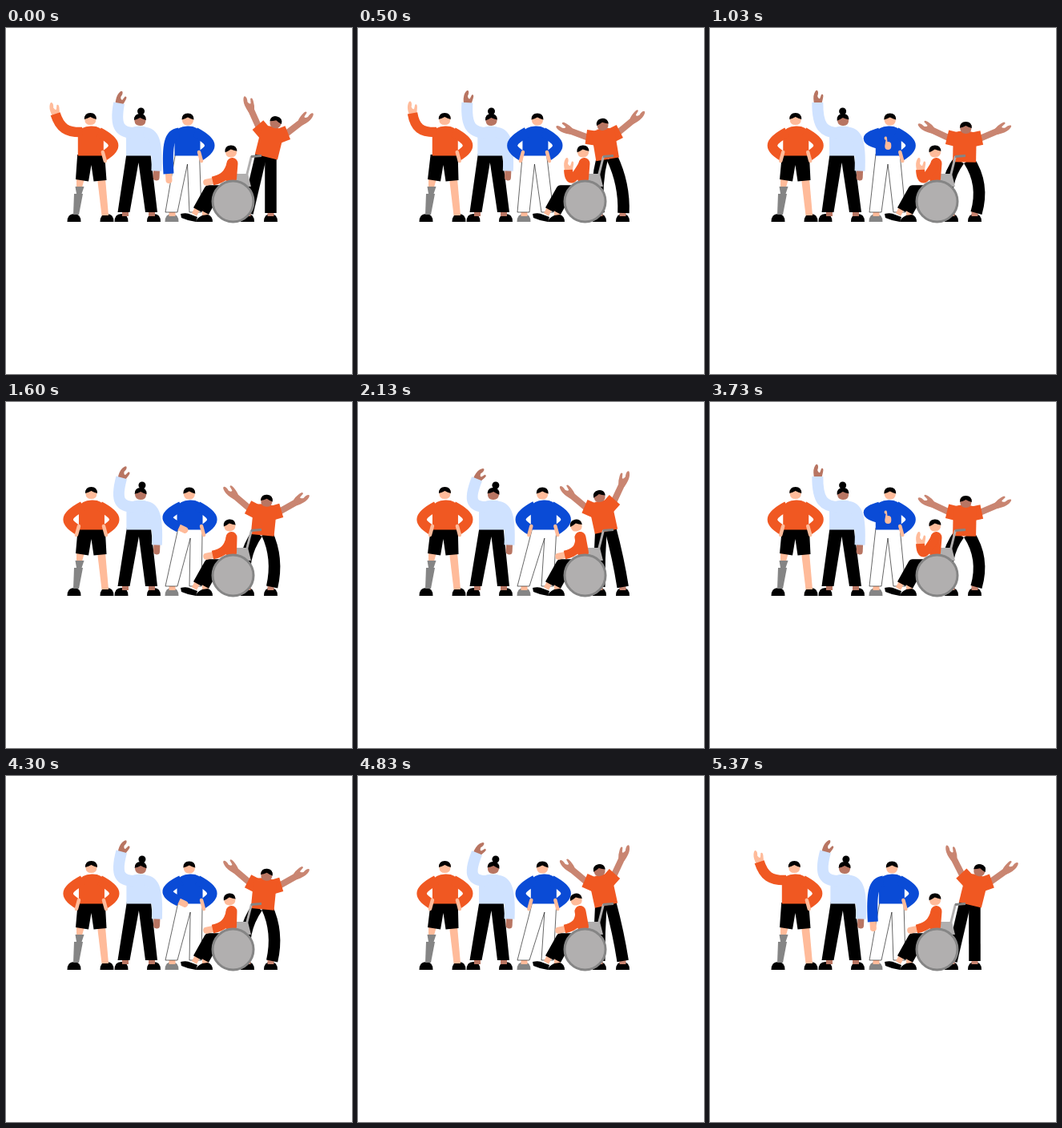
Recreate the animation shown at these times as an HTML page. Size 432x432 px, loop 5.41 s.

```html
<!DOCTYPE html>
<html lang="en">
<head>
<meta charset="utf-8">
<style>
  html, body { margin: 0; width: 100%; height: 100%; overflow: hidden; background: #fff; }
  svg { display: block; width: 100vw; height: 100vh; }
</style>
</head>
<body>
<svg id="stage" viewBox="0 0 432 432"></svg>
<script>
const stage = document.getElementById('stage');
const LOOP = 5410, CYCLE = 2700, TAU = Math.PI * 2;
const ORANGE = '#f05822', BLUE = '#0a4bd6', PALE = '#cfe2ff', BLACK = '#000', WHITE = '#fff';
const PEACH = '#ffbb9a', BROWN = '#b87562', TAN = '#c98571', GREY = '#858585', SILVER = '#b1afaf';

const mix = (a, b, k) => a + (b - a) * k;
const mixPoint = (p, q, k) => [mix(p[0], q[0], k), mix(p[1], q[1], k)];
const ramp = (t, from, to) => {
  const k = Math.min(1, Math.max(0, (t - from) / (to - from)));
  return k * k * (3 - 2 * k);
};
// Point at a clockwise angle in degrees, measured from straight up.
const polar = ([x, y], angle, length) => {
  const a = angle * TAU / 360;
  return [x + length * Math.sin(a), y - length * Math.cos(a)];
};
const heading = (p, q) => Math.atan2(q[0] - p[0], p[1] - q[1]) * 360 / TAU;

const fill = (d, color, extra = '') => `<path d="${d}" fill="${color}" ${extra}/>`;
const line = (d, color, width, cap = 'butt') =>
  `<path d="${d}" fill="none" stroke="${color}" stroke-width="${width}" stroke-linecap="${cap}" stroke-linejoin="round"/>`;
const at = ([x, y], angle, content) =>
  `<g transform="translate(${x} ${y}) rotate(${angle})">${content}</g>`;

const shoe = (x, color = BLACK) => fill(`M${x - 8.5} 242q0-10 8.5-10t8.5 10z`, color);
const ankle = (x, color) => line(`M${x} 227V235`, color, 8);

const head = (x, y, skin, tilt = 0) => at([x, y], tilt,
  fill('M-7-4V1Q-6.500 7 0 7T7 1V-4z', skin) +
  fill('M-7.500 0Q-7.500-8 0-8T7.500 0Q3.500-1 0-3Q-3.500-1-7.500 0z', BLACK));

const hand = skin => fill('M-4 3Q-6-6-4-11T0-15Q2-13 0-8Q1-4 3-5L5-10Q8-11 7-6Q6 0 4 3z', skin);
const fist = skin => line('M0 2V-8', skin, 8, 'round');

// A sleeve curves from shoulder to wrist around a corner point; the hand follows the forearm.
function arm({ shoulder, corner, wrist, flick = 0 }, color, width, handShape) {
  const [near, far] = [shoulder, wrist].map(p => mixPoint(p, corner, .75));
  return at(wrist, heading(corner, wrist) + flick, handShape) +
    line(`M${shoulder}C${near} ${far} ${wrist}`, color, width);
}

const mixArm = (a, b, k) => ({
  shoulder: mixPoint(a.shoulder, b.shoulder, k),
  corner: mixPoint(a.corner, b.corner, k),
  wrist: mixPoint(a.wrist, b.wrist, k)
});

const onHip = (x, side) =>
  ({ shoulder: [x + side * 10, 130], corner: [x + side * 40, 146], wrist: [x + side * 16, 160] });

const hipHand = (x, side, skin) =>
  line(`M${x + side * 15} 155l${side * 3} 11`, skin, 4.5, 'round');

const torso = (x, color) => at([x, 123], 0, fill('M-16 8Q-13 0 0-.5T16 8V36.500H-16z', color));

function trousers(waist, left, right, crotch, color, outline = '') {
  return fill(`M${waist - 15} 157L${left - 7.5} 230H${left + 7.5}L${waist} ${crotch}
    L${right - 7.5} 230H${right + 7.5}L${waist + 15} 157z`, color, outline);
}

function waver(t) {
  const beat = t + 15;
  const sway = -1.7 * Math.cos(TAU * beat / 1350);
  const raised = 1 - ramp(t, 770, 1000) + ramp(t, 2260, 2460);
  const corner = [71, 131];
  const waving = {
    shoulder: [97, 130], corner,
    wrist: polar(corner, -9 - 9 * Math.cos(TAU * beat / 675), 25)
  };
  const left = mixArm(onHip(106.5, -1), waving, raised);
  const swing = Math.sin(Math.PI * raised);
  left.wrist[0] -= 28 * swing;
  left.corner[0] -= 6 * swing;
  return shoe(85) + shoe(126) +
    fill('M114 188H124L128 234H119.500z', PEACH) +
    fill('M88 188H98L95 199H88z', PEACH) +
    fill('M86.500 198H97.500L94.500 207H96L91 233H84L85 207H88z', GREY) +
    fill(`M${90 + sway / 2} 158H${124 + sway / 2}L125.500 190 109.500 191.500 106.500 171 103 191.500 87 189z`, BLACK) +
    at([sway, 0], 0,
      torso(107.5, ORANGE) +
      arm(onHip(107.5, 1), ORANGE, 12.5, '') + hipHand(107.5, 1, PEACH) +
      arm(left, ORANGE, 12.5, raised > .1 ? hand(PEACH) : '') +
      (raised > .1 ? '' : hipHand(106.5, -1, PEACH)) +
      head(107, 114, PEACH));
}

function greeter(t) {
  const wave = Math.cos(TAU * (t - 335) / 450);
  const corner = [134, 132];
  const raised = {
    shoulder: [163, 131], corner,
    wrist: polar(corner, 11 + 11 * wave, 39),
    flick: 6 + 8 * wave
  };
  const lowered = { shoulder: [172, 130], corner: [190, 131], wrist: [188, 178.5] };
  return shoe(144) + shoe(184.5) + ankle(149, BROWN) + ankle(182, BROWN) +
    trousers(165.5 + wave, 147, 181.5, 168, BLACK) +
    at([wave, 0], 0, torso(166, PALE) + arm(lowered, PALE, 13, fist(BROWN))) +
    arm(raised, PALE, 14, hand(BROWN)) +
    `<circle cx="${168.7 + wave * 3.2}" cy="104" r="4.500"/>` +
    head(167.5 + wave * 1.5, 115, BROWN, wave * 5);
}

function thumbsUp(t) {
  const sway = -5.5 * Math.sin(TAU * t / CYCLE);
  const lowered = 1 - ramp(t, 60, 290) + ramp(t, 2330, 2600);
  const thumb = ramp(t, 500, 800) - ramp(t, 1400, 1700);
  const shoulder = [216, 131];
  const hanging = { shoulder, corner: [200, 133], wrist: [203, 182] };
  const signal = { shoulder, corner: [189, 139], wrist: [222, 146] };
  const pose = mixArm(mixArm(onHip(226, -1), hanging, lowered), signal, thumb);
  const thumbHand = line('M4 0V2', PEACH, 8, 'round') + line('M2-1L1-9', PEACH, 3.2, 'round');
  const resting = lowered < .1 && thumb < .1;
  const restingHand = thumb > .5 ? at([0, 0], -heading(pose.corner, pose.wrist), thumbHand) : fist(PEACH);
  return shoe(207, GREY) + ankle(207.5, PEACH) +
    trousers(226.5 + sway * 1.2, 206.5, 236.5, 170, WHITE, 'stroke="#000" stroke-width=".6"') +
    at([sway, 0], 0,
      torso(226.5, BLUE) +
      arm(onHip(226, 1), BLUE, 12.5, '') + hipHand(226, 1, PEACH) +
      arm(pose, BLUE, 13, resting ? '' : restingHand) +
      (resting ? hipHand(226, -1, PEACH) : '')) +
    head(227 + sway * .6, 114.5, PEACH);
}

function dancerArm(side, raise) {
  const shoulder = [side * 7, -27];
  const cuff = polar(shoulder, side * (78 - 25 * raise), 15);
  return at(cuff, side * (67 - 31 * raise),
    line('M0 6V-24', TAN, 8) +
    `<g transform="translate(0 -23) scale(${-side} 1.100)">${hand(TAN)}</g>`) +
    line(`M${mixPoint(shoulder, cuff, -.2)}L${cuff}`, ORANGE, 18);
}

function dancer(t) {
  const phase = t - 1015;
  const lean = Math.sin(Math.PI * phase / 675);
  const bend = 1 - Math.min(1, lean * lean * 1.15);
  const raise = .5 - .5 * Math.cos(TAU * (phase - 55) / 675);
  const x = 316.5 + 8 * lean, y = 160.5 + 6.5 * bend;
  const leg = side => {
    const top = x + side * 6, foot = 316 + side * (14.5 + 2 * bend);
    const knee = mix((top + foot) / 2, 316 + side * 27, bend);
    return line(`M${top} ${y - 2}Q${knee} 195 ${foot} 231`, BLACK, 14.5);
  };
  return [-1, 1].map(side => shoe(316 + side * 14.5) + ankle(316 + side * 14.5, TAN) + leg(side)).join('') +
    at([x, y], 14 * lean,
      dancerArm(-1, raise) + dancerArm(1, raise) +
      fill('M-14-36Q0-41 15-36L15 .5H-14z', ORANGE) +
      head(1.5, -44 + 2 * bend, BROWN));
}

function wheelchairUser(t) {
  const raised = ramp(t, 70, 300) - ramp(t, 1230, 1480);
  const lean = ramp(t, 1500, 1850) - ramp(t, 2280, 2560);
  const shoulder = [281 - 4 * lean, 170];
  const lap = { shoulder, corner: [276, 187], wrist: [258, 191] };
  const hello = { shoulder, corner: [264, 199], wrist: [262.5, 177] };
  const leg = (x, y) => line(`M284 ${y}H${x}L${x - 14} ${y + 25}`, BLACK, 11.5);
  return line('M300 186L306.500 160', SILVER, 3) + line('M306 160.500L319 159.500', GREY, 3) +
    line('M241 222L235 233', PEACH, 7) + ankle(249, PEACH) +
    leg(253, 202) + leg(262, 205) +
    fill('M218 232Q226 230 231 233L239 236 237 242Q228 241 219 237z', BLACK) +
    fill('M237 242Q238 237 245 234L252 233Q258 235 258 242z', BLACK) +
    fill('M284 182H302L306 198H278z', SILVER) +
    line(`M${282.5 - 5 * lean} 169L281 188`, ORANGE, 14, 'round') +
    arm(mixArm(lap, hello, raised), ORANGE, 11, raised > .4 ? hand(PEACH) : fist(PEACH)) +
    head(281 - 8.5 * lean, 154.5, PEACH, -6 - 6 * lean) +
    `<circle cx="283.500" cy="216.500" r="25.500" fill="${SILVER}" stroke="${GREY}" stroke-width="3"/>`;
}

function draw(time) {
  const t = time % LOOP % CYCLE;
  stage.innerHTML = [waver, greeter, thumbsUp, dancer, wheelchairUser].map(person => person(t)).join('');
}

const start = performance.now();
function tick() {
  draw(performance.now() - start);
  requestAnimationFrame(tick);
}
tick();
</script>
</body>
</html>
```
